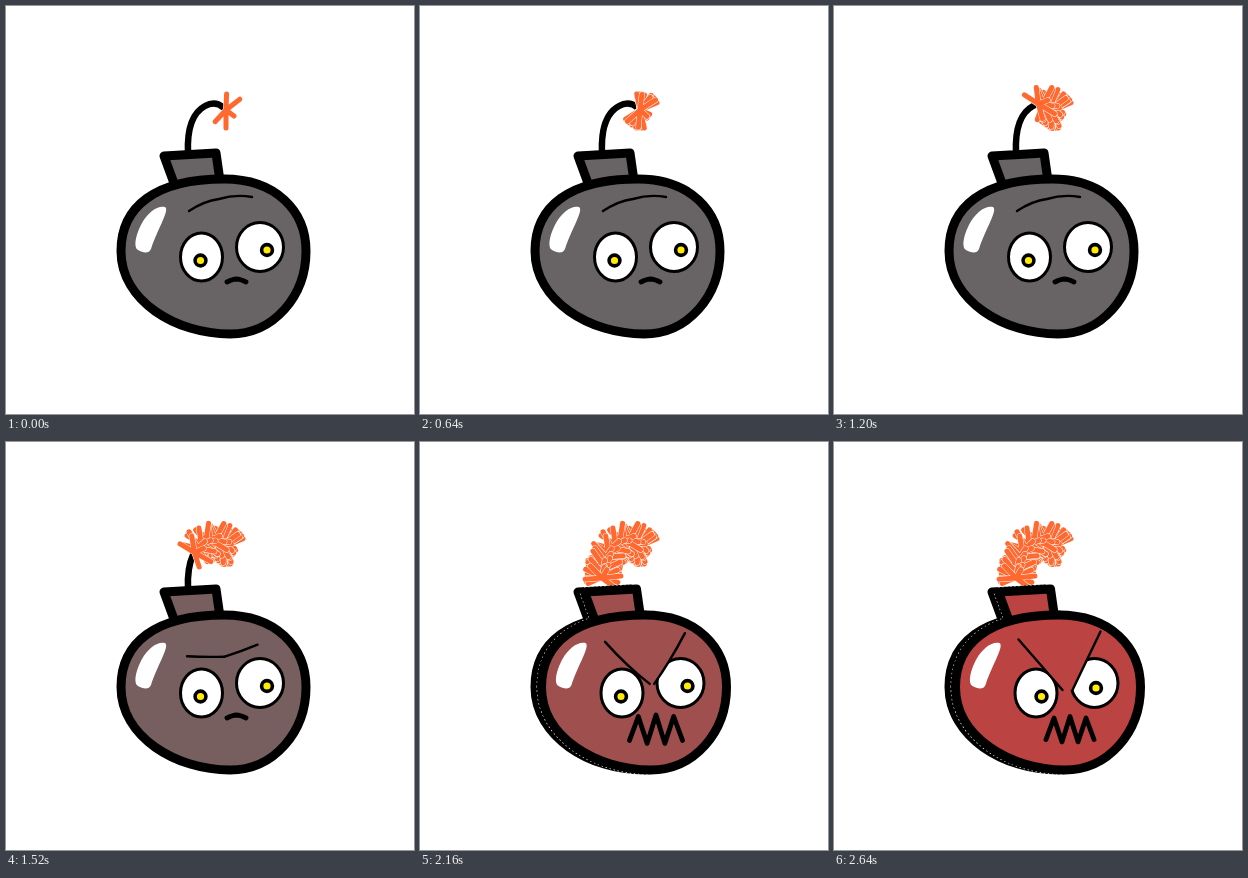
Recreate the animation shown at these times as an HTML page. Size 408 by 408 pixels, loop 4.2 s.

```html
<!DOCTYPE html>
<html lang="en">
<head>
<meta charset="utf-8">
<title>Angry bomb</title>
<style>
  html, body { margin: 0; width: 100%; height: 100%; overflow: hidden; background: #fff; }
  svg { display: block; width: 100%; height: 100%; }
</style>
</head>
<body>
<svg viewBox="0 0 408 408" fill="none" stroke-linecap="round" stroke-linejoin="round">
  <defs>
    <path id="ball" d="M115 245C115 201 149 173 218 173C270 173 300 205 300 245C300 290 268 328 224 328C170 328 115 295 115 245Z"/>
    <path id="neck" d="M158 150L210 147L214 175L169 180Z"/>
  </defs>
  <path id="fuse" d="M220 104C214 97 206 96 199 100C186 107 181 124 182 147" stroke="#000" stroke-width="6.5"/>
  <g id="sparks"></g>
  <g id="ghost" fill="#000" stroke="#000" stroke-width="9">
    <use href="#neck"/>
    <use href="#ball"/>
  </g>
  <g id="bomb">
    <g id="fringe" stroke="#fff" stroke-width="10" stroke-dasharray="1.5 2.5" stroke-linecap="butt">
      <use href="#neck"/>
      <use href="#ball"/>
    </g>
    <g fill="currentColor" stroke="#000" stroke-width="9">
      <use href="#neck"/>
      <use href="#ball"/>
    </g>
    <path fill="#fff" d="M159 201C164 204 152 222 145 243C143 248 137 247 132 244C127 241 130 228 136 217C142 206 152 199 159 201Z"/>
    <g fill="#fff" stroke="#000" stroke-width="3">
      <ellipse cx="195.5" cy="251" rx="21" ry="24"/>
      <ellipse cx="254" cy="241" rx="23.5" ry="24.5"/>
    </g>
    <g fill="#ffec00" stroke="#000" stroke-width="3.6">
      <circle id="pupilL" r="5.4"/>
      <circle id="pupilR" r="5.4"/>
    </g>
    <path id="lid" fill="currentColor"/>
    <path id="brow" stroke="#000" stroke-width="2.4"/>
    <path id="mouth" stroke="#000" stroke-width="4.8"/>
  </g>
</svg>
<script>
const LOOP = 4200, STEP = 80, LAST = 33;
const BURN_START = 700, BURN_END = 2160, BURN_LENGTH = 65;

const $ = id => document.getElementById(id);
const lerp = (a, b, k) => a + (b - a) * k;
const ramp = (t, from, to) => Math.min(1, Math.max(0, (t - from) / (to - from)));
const smooth = k => k * k * (3 - 2 * k);
const easeOut = k => 1 - (1 - k) * (1 - k);

function set(id, attrs) {
  for (const key in attrs) $(id).setAttribute(key, attrs[key]);
}

function show(id, on) {
  $(id).style.display = on ? '' : 'none';
}

// Interpolates rows of [time, ...values]
function track(rows, t) {
  const i = Math.max(1, rows.findIndex(row => t < row[0]));
  const last = rows[rows.length - 1];
  if (t >= last[0]) return last.slice(1);
  const [a, b] = [rows[i - 1], rows[i]];
  const k = ramp(t, a[0], b[0]);
  return a.slice(1).map((v, j) => lerp(v, b[j + 1], k));
}

const burnt = t => smooth(ramp(t, BURN_START, BURN_END));

// One star per step; they pile up along the burnt fuse
const ARMS = [[-88, 16], [-38, 17.5], [37, 10], [90, 18], [133, 16]];
function sparkPath(i) {
  const k = burnt(i * STEP);
  const p = $('fuse').getPointAtLength(k * BURN_LENGTH);
  const turn = -110 * k ** 0.7 + 15 * Math.sin(i * 2.4);
  return ARMS.map(([angle, length], j) => {
    const a = (angle + turn) * Math.PI / 180;
    const r = length + (i && Math.sin(i * 3.1 + j * 2));
    return `M${p.x} ${p.y}l${r * Math.cos(a)} ${r * Math.sin(a)}`;
  }).join('');
}

const sparks = [];
for (let i = 0; i * STEP <= BURN_END; i++) {
  const g = document.createElementNS('http://www.w3.org/2000/svg', 'g');
  const d = sparkPath(i);
  g.innerHTML = `<path d="${d}" stroke="#fff" stroke-width="5.9"/><path d="${d}" stroke="#ff682f" stroke-width="5"/>`;
  $('sparks').append(g);
  sparks.push(g);
}

function drawFuse(t, step) {
  set('fuse', { 'stroke-dasharray': `0 ${burnt(t) * BURN_LENGTH + 3} 200` });
  show('fuse', t < BURN_END - STEP);
  sparks.forEach((g, i) => { g.style.display = i <= step ? '' : 'none'; });
}

function drawBody(t) {
  const dx = 6.5 * ramp(t, 1600, 1760);
  const heat = ramp(t, 1280, 2640);
  const rgb = [lerp(104, 187, heat), lerp(100, 68, heat), lerp(101, 66, heat)];
  show('ghost', dx);
  show('fringe', dx);
  set('bomb', { transform: `translate(${dx} 0)`, color: `rgb(${rgb.map(Math.round)})` });
}

function drawEyes(t) {
  const k = ramp(t, 2160, 2640);
  set('pupilL', { cx: 194.5 + 6.5 * k, cy: 254.5 });
  set('pupilR', { cx: 261 - 5.5 * k, cy: 244 + 2 * k });
}

// The inner ends sink into a V, which also covers the eyes' corners
const BROW_HEIGHT = [[1200, 198], [1520, 208.5], [1840, 206], [2160, 195.5], [2640, 193.5]];
function drawBrows(t) {
  const k = ramp(t, 1200, 2640), e = easeOut(k);
  const [height] = track(BROW_HEIGHT, Math.max(t, 1200));
  const tilt = 7 - 3 * e;
  const sag = 6 * Math.sin(Math.PI * k) - 4 * (1 - k);
  const mid = 213 + 14 * e, gap = 5 * k * k, innerY = 193 + 55 * e;
  const outerL = [183 - 5 * e, height + tilt], innerL = [mid - gap, innerY];
  const innerR = [mid + gap, innerY], outerR = [246 + 14 * e, height - tilt];
  const arc = (a, b) => `${a}Q${(a[0] + b[0]) / 2} ${(a[1] + b[1]) / 2 + sag} ${b}`;
  const left = arc(outerL, innerL), right = arc(innerR, outerR);
  set('lid', { d: `M${left}L${right}Z` });
  set('brow', { d: `M${left}M${right}` });
}

// Rows: time, left, width, centre height, tooth size
const MOUTH = [
  [1520, 221, 19, 276, 0],
  [1840, 210.5, 43, 288, 9],
  [2160, 203, 53, 290, 14],
  [2640, 205.5, 48, 290, 12.5]
];
function drawMouth(t) {
  const [x, width, y, tooth] = track(MOUTH, Math.max(t, 1520));
  const points = [];
  for (let i = 0; i <= 6; i++) {
    const size = i % 6 ? tooth : tooth * 0.6;
    const arch = 3 * Math.sin(Math.PI * i / 6);
    points.push([x + width * i / 6, y - arch + (i % 2 ? -size : size)]);
  }
  set('mouth', { d: 'M' + points.join('L') });
}

function draw(step) {
  const t = step * STEP;
  drawFuse(t, step);
  drawBody(t);
  drawEyes(t);
  drawBrows(t);
  drawMouth(t);
}

const start = performance.now();
let shown = -1;
function tick() {
  const t = (performance.now() - start) % LOOP;
  const step = Math.min(LAST, Math.floor(t / STEP));
  if (step !== shown) draw(shown = step);
  requestAnimationFrame(tick);
}
tick();
</script>
</body>
</html>
```
